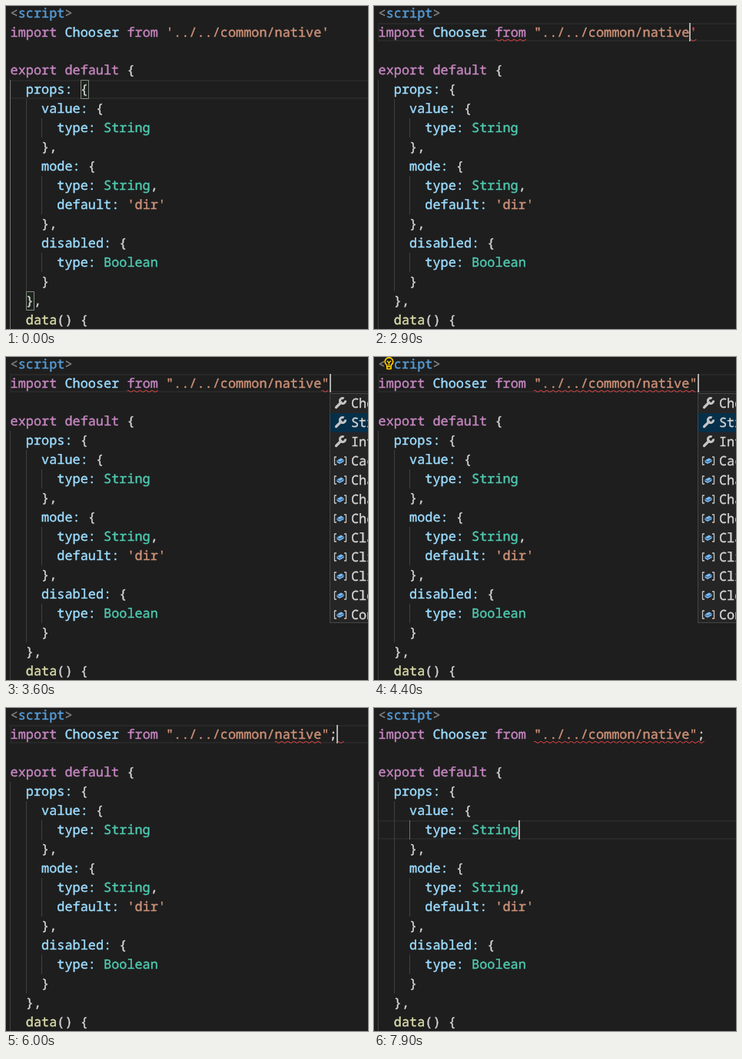
Animation, 471 px wide and 420 px high, one loop 8 s. Source, as an HTML page with a canvas:

```html
<!DOCTYPE html>
<html lang="en">
<head>
<meta charset="utf-8">
<title>Editor</title>
<style>
  html, body { margin: 0; width: 100%; height: 100%; overflow: hidden; background: #1e1e1e; }
  canvas { display: block; width: 471px; height: 420px; }
</style>
</head>
<body>
<canvas id="stage" width="471" height="420"></canvas>
<script>
const ctx = document.getElementById('stage').getContext('2d');
const W = 471, H = 420, LOOP = 8000;
const X0 = 5.6, CW = 10.12, LH = 24.94;
const colX = c => X0 + c * CW;
const rowY = r => Math.floor(-2.9 + r * LH);

const INK = {
  key: '#c586c0', name: '#9cdcfe', str: '#ce9178', type: '#4ec9b0', text: '#d4d4d4',
  fn: '#dcdcaa', tag: '#569cd6', dim: '#808080', bad: '#f44747'
};

// Each line: indent, then pairs of ink and text.
const LINES = [
  [0, 'dim', '<', 'tag', 'script', 'dim', '>'],
  null,
  null,
  [0, 'key', 'export default ', 'text', '{'],
  [2, 'name', 'props: ', 'text', '{'],
  [4, 'name', 'value: ', 'text', '{'],
  [6, 'name', 'type: ', 'type', 'String'],
  [4, 'text', '},'],
  [4, 'name', 'mode: ', 'text', '{'],
  [6, 'name', 'type: ', 'type', 'String', 'text', ','],
  [6, 'name', 'default: ', 'str', "'dir'"],
  [4, 'text', '},'],
  [4, 'name', 'disabled: ', 'text', '{'],
  [6, 'name', 'type: ', 'type', 'Boolean'],
  [4, 'text', '}'],
  [2, 'text', '},'],
  [2, 'fn', 'data', 'text', '() {']
];

const ITEMS = ['Chooser', 'String', 'Interval', 'Cache', 'Channel', 'Chart', 'Check',
  'Class', 'Client', 'Clip', 'Clone', 'Config'];

// Indent guides: column, first row, row after the last.
const GUIDES = [[0, 4, 17], [2, 5, 15], [4, 6, 7], [4, 9, 11], [4, 13, 14]];

const FROM = [15, 19], TAIL = [40, 41], WHOLE = [20, 41], WORD = [34, 40];
const END = 41.95;

const START = {
  open: "'", close: "'", after: '', bad: false, caret: null, line: 4, sel: null,
  marks: [], waves: [], popup: false, bulb: false, guide: 0, brackets: true
};

// What changes, and when.
const STEPS = [
  [1000, { sel: 20, caret: [1, 20], line: null, guide: null, brackets: false }],
  [1100, { marks: [[1, 40], [10, 15], [10, 19]] }],
  [1500, { caret: null }],
  [2000, { caret: [1, 20] }],
  [2200, { open: '"', bad: true, sel: null, marks: [], caret: [1, 21], line: 1 }],
  [2500, { waves: [FROM, TAIL] }],
  [2700, { caret: null }],
  [2900, { caret: [1, 40] }],
  [3100, { sel: 40, marks: [[10, 15], [10, 19]], caret: [1, 41], line: null }],
  [3500, { close: '"', bad: false, sel: null, marks: [], line: 1 }],
  [3600, { popup: true }],
  [3700, { waves: [] }],
  [3800, { waves: [WHOLE], bulb: true }],
  [3900, { caret: null }],
  [4400, { caret: [1, 41] }],
  [4700, { after: ',', popup: false, caret: [1, END] }],
  [4900, { bulb: false }],
  [5000, { waves: [] }],
  [5100, { waves: [WORD, [41, END]] }],
  [5200, { caret: null }],
  [5600, { caret: [1, END] }],
  [5800, { after: '', caret: [1, 41] }],
  [5900, { after: ';', caret: [1, END] }],
  [6000, { waves: [WORD, [42, 43]] }],
  [6200, { waves: [[20, END]] }],
  [6400, { caret: null }],
  [6800, { caret: [1, END] }],
  [7200, { caret: [7, 6], line: 7, guide: 1 }],
  [7600, { caret: null }],
  [7900, { caret: [6, 18], line: 6, guide: 2 }]
];

const stateAt = t => Object.assign({}, START, ...STEPS.filter(s => s[0] <= t).map(s => s[1]));

function rect(color, x, y, w, h) {
  ctx.fillStyle = color;
  ctx.fillRect(x, y, w, h);
}

function stroke(color, width, points) {
  ctx.strokeStyle = color;
  ctx.lineWidth = width;
  ctx.beginPath();
  points.forEach(([x, y]) => ctx.lineTo(x, y));
  ctx.stroke();
}

// A hairline outline gives the glyphs a slightly heavier weight.
function write(color, text, x, y) {
  ctx.fillStyle = ctx.strokeStyle = color;
  ctx.lineWidth = .4;
  ctx.fillText(text, x, y);
  ctx.strokeText(text, x, y);
}

function cell(color, row, col) {
  const x = Math.round(colX(col)), y = rowY(row);
  ctx.fillStyle = color;
  ctx.beginPath();
  ctx.roundRect(x, y, Math.round(colX(col + 1)) - x, rowY(row + 1) - y, 3);
  ctx.fill();
}

function codeLine(row, [indent, ...parts]) {
  let col = indent;
  for (let i = 0; i < parts.length; i += 2) {
    write(INK[parts[i]], parts[i + 1], colX(col), rowY(row) + 18);
    col += parts[i + 1].length;
  }
}

function lineBorder(row) {
  const y = rowY(row);
  rect('#282828', 5, y, W, 2);
  rect('#282828', 5, rowY(row + 1) - 2, W, 2);
  rect('#282828', 5, y, 2, 25);
}

function bracketBox(row, col) {
  const x = Math.round(colX(col)), y = rowY(row);
  rect('rgba(0,100,0,.1)', x, y, 11, 25);
  ctx.strokeStyle = '#888';
  ctx.lineWidth = 1;
  ctx.strokeRect(x + .5, y + .5, 10, 24);
}

function wave([from, to]) {
  const x = colX(from), end = colX(to), half = 3.94;
  ctx.save();
  ctx.beginPath();
  ctx.rect(x, 43, end - x, 3);
  ctx.clip();
  const points = [];
  for (let i = 0; x + (i - 1) * half < end; i++) points.push([x + (i - .7) * half, i % 2 ? 43.3 : 45.7]);
  stroke('#ea4646', 1, points);
  ctx.restore();
}

function wrench(y) {
  ctx.lineCap = 'round';
  stroke('#c5c5c5', 3.2, [[429.5, y + 5.5], [436, y - 1]]);
  ctx.lineCap = 'butt';
  ctx.lineWidth = 3;
  ctx.beginPath();
  ctx.arc(438, y - 3, 3.6, -.15, Math.PI * 1.65);
  ctx.stroke();
}

function cube(y) {
  stroke('#c5c5c5', 1.3, [[430, y - 5], [427.5, y - 5], [427.5, y + 5], [430, y + 5]]);
  stroke('#c5c5c5', 1.3, [[440, y - 5], [442.5, y - 5], [442.5, y + 5], [440, y + 5]]);
  ctx.fillStyle = '#75beff';
  ctx.beginPath();
  [[430.5, y - .5], [436, y - 3.5], [439.5, y - 1.5], [439.5, y + 1], [434, y + 4], [430.5, y + 2]]
    .forEach(([x, v]) => ctx.lineTo(x, v));
  ctx.fill();
  stroke('#252526', .8, [[431, y], [434.3, y + 1.5], [439, y - 1]]);
}

function popup() {
  rect('#454545', 421, 47, 60, 299);
  rect('#252526', 422, 48, 60, 297);
  rect('#062f4a', 422, 73, 60, 25);
  ITEMS.forEach((item, i) => {
    const y = Math.round(60.3 + i * LH);
    (i < 3 ? wrench : cube)(y);
    write(INK.text, item, 449, y + 6);
  });
}

function bulb() {
  const yellow = '#ffcc00';
  rect('#1e1e1e', 13, 0, 13, 18);
  ctx.strokeStyle = yellow;
  ctx.lineWidth = 1.7;
  ctx.beginPath();
  ctx.arc(19.5, 6, 5.2, Math.PI * .68, Math.PI * 2.32);
  ctx.lineTo(22, 15.5);
  ctx.lineTo(17, 15.5);
  ctx.closePath();
  ctx.stroke();
  stroke(yellow, 1.4, [[17, 5], [19.5, 7.5], [22, 5]]);
  stroke(yellow, 1.4, [[19.5, 7], [19.5, 12]]);
  stroke(yellow, 1.4, [[17, 12.5], [22, 12.5]]);
}

function draw(t) {
  const s = stateAt(t);
  rect('#1e1e1e', 0, 0, W, H);
  ctx.font = '16.87px "Noto Sans Mono", "DejaVu Sans Mono", monospace';
  ctx.textRendering = 'geometricPrecision';
  ctx.lineJoin = 'round';

  if (s.line !== null) lineBorder(s.line);
  GUIDES.forEach(([col, from, to], i) =>
    rect(i === s.guide ? '#707070' : '#404040', Math.floor(colX(col) + .2), rowY(from), 1, rowY(to) - rowY(from)));
  if (s.brackets) {
    bracketBox(4, 9);
    bracketBox(15, 2);
  }
  if (s.sel !== null) cell('#264f78', 1, s.sel);
  s.marks.forEach(([row, col]) => cell('rgba(173,214,255,.15)', row, col));

  LINES.forEach((line, row) => line && codeLine(row, line));
  codeLine(1, [0, 'key', 'import ', 'name', 'Chooser ', 'key', 'from ',
    'str', s.open + '../../common/native', s.bad ? 'bad' : 'str', s.close, 'text', s.after]);

  s.waves.forEach(wave);
  if (s.caret) {
    const [row, col] = s.caret;
    rect('#aeafad', Math.round(colX(col)), rowY(row), 2, rowY(row + 1) - rowY(row));
  }
  if (s.popup) popup();
  if (s.bulb) bulb();
}

const begin = performance.now();
function tick() {
  draw((performance.now() - begin) % LOOP);
  requestAnimationFrame(tick);
}
tick();
</script>
</body>
</html>
```
